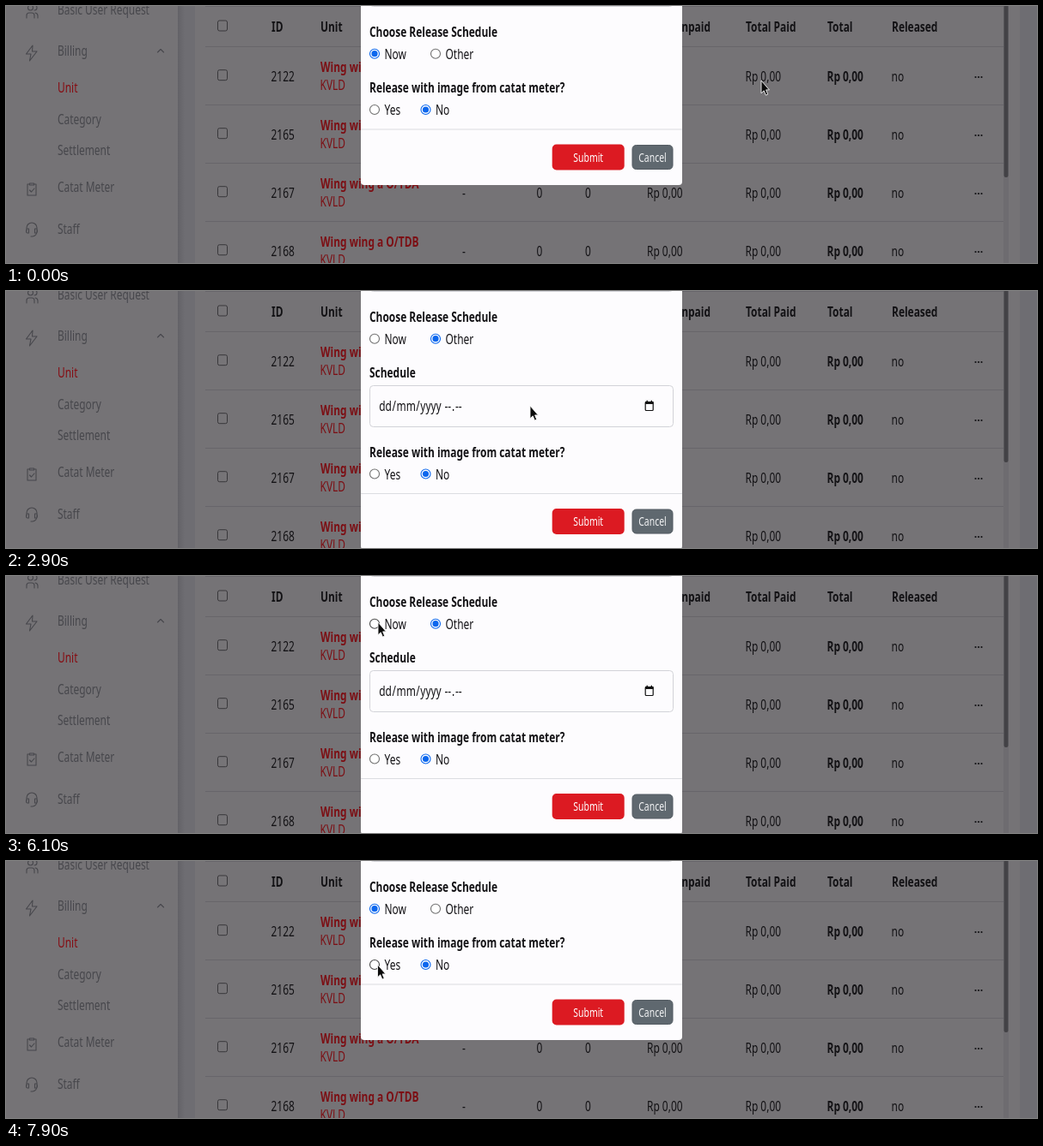
These frames come from a looping animation (1200 px wide and 300 px high, 8 s). An HTML page:

```html
<!DOCTYPE html>
<html lang="en">
<head>
<meta charset="utf-8">
<title>Release schedule</title>
<style>
  html, body { margin: 0; width: 100%; height: 100%; overflow: hidden; background: #757376; }
  svg { display: block; width: 100vw; height: 100vh; cursor: default; }
  text { font-family: "Noto Sans", "Open Sans", sans-serif; font-size: 16px; white-space: pre; }
  .b { font-weight: 600; }
</style>
</head>
<body>
<svg id="stage" viewBox="0 0 1200 300" preserveAspectRatio="none"></svg>
<script>
const NS = "http://www.w3.org/2000/svg";
const stage = document.getElementById("stage");

function add(parent, tag, attrs = {}) {
  const el = document.createElementNS(NS, tag);
  for (const k in attrs) el.setAttribute(k, attrs[k]);
  parent.appendChild(el);
  return el;
}

// Use the installed condensed face; if there is none, narrow the regular one.
function pickFace() {
  const probe = add(stage, "text");
  probe.textContent = "Basic User Request";
  const wanted = 107;
  let best = null;
  for (const stretch of ["normal", "condensed", "extra-condensed"]) {
    probe.style.fontStretch = stretch;
    const ratio = wanted / probe.getComputedTextLength();
    if (!best || Math.abs(ratio - 1) < Math.abs(best.ratio - 1)) best = { stretch, ratio };
  }
  probe.remove();
  stage.style.fontStretch = best.stretch;
  return Math.abs(best.ratio - 1) < 0.04 ? 1 : best.ratio;
}
const narrow = pickFace();

function label(parent, str, x, y, fill, opts = {}) {
  const el = add(parent, "text", {
    transform: `translate(${x} ${y}) scale(${narrow} 1)`,
    fill,
    "text-anchor": opts.anchor || "start"
  });
  if (opts.bold) el.setAttribute("class", "b");
  if (opts.size) el.style.fontSize = opts.size + "px";
  el.textContent = str;
  return el;
}
const box = (parent, x, y, width, height, fill, more) =>
  add(parent, "rect", { x, y, width, height, fill, ...more });
const stroke = (parent, d, color, width = 1.1) =>
  add(parent, "path", {
    d, fill: "none", stroke: color, "stroke-width": width,
    "stroke-linecap": "round", "stroke-linejoin": "round"
  });
const group = (parent) => add(parent, "g");

const PAPER = "#757376", INK = "#131215", MUTED = "#47474c", RED = "#7c0f14", LINE = "#67656a";

function drawPage() {
  const g = group(stage);
  const fade = add(add(g, "defs"), "linearGradient", { id: "edge" });
  add(fade, "stop", { offset: 0, "stop-color": "#636267" });
  add(fade, "stop", { offset: 1, "stop-color": "#6e6d72" });
  box(g, 0, 0, 1200, 300, "#6e6d72");
  box(g, 200, 0, 8, 300, "url(#edge)");
}

function drawSidebar() {
  const g = group(stage);
  box(g, 0, 0, 200, 300, PAPER);
  const items = [
    ["Basic User Request", 9.5], ["Billing", 58], ["Unit", 101], ["Category", 137.5],
    ["Settlement", 174], ["Catat Meter", 217], ["Staff", 266]
  ];
  for (const [name, y] of items) label(g, name, 60, y, name === "Unit" ? "#860d13" : MUTED);
  stroke(g, "M176.5 54L180 50.5L183.5 54", MUTED);
  // users
  stroke(g, "M24 14V11Q24 8 27 8H30Q33 8 33 11V14M34 8Q37 8.5 37 11.5V14M31.5 2A3 3 0 1 1 25.5 2A3 3 0 1 1 31.5 2M33 -1A3 3 0 0 1 33 5", MUTED);
  // bolt
  stroke(g, "M31 46L23.5 56H29L27.5 64L36 53H30.5Z", MUTED);
  // clipboard
  stroke(g, "M27 208H25V221H35V208H33M27.5 207H32.5V209H27.5ZM27.5 215L29.5 217L33 213", MUTED);
  // headset
  stroke(g, "M24 262V259A6 6 0 0 1 36 259V263Q36 268 31 269M24 260H26.5V265H25Q23.5 265 23.5 262.5ZM36 260H33.5V265H35Q36.5 265 36.5 262.5ZM29 269H31", MUTED);
}

function drawTable() {
  const g = group(stage);
  box(g, 220, 0, 960, 300, PAPER);
  for (const y of [0, 47, 115, 183, 251]) box(g, 232, y, 930, 1, LINE);
  box(g, 1161, 0, 6, 300, "#6e6c70");
  box(g, 1161.5, -6, 5, 206, "#434246", { rx: 2.5 });

  const heads = [["ID", 309], ["Unit", 366], ["Total Paid", 861], ["Total", 956], ["Released", 1031]];
  for (const [name, x] of heads) label(g, name, x, 30, INK, { bold: true });
  label(g, "Unpaid", 820, 30, INK, { bold: true, anchor: "end" });

  const check = (y) => box(g, 246.5, y - 6, 11, 12, "#767477", { rx: 2, stroke: "#38373a" });
  check(23);

  [[2122, "X"], [2165, "X"], [2167, "A"], [2168, "B"]].forEach(([id, suffix], i) => {
    const y = 88 + i * 68;
    check(y - 7.3);
    label(g, id, 308.5, y, INK);
    label(g, "Wing wing a O/TD" + suffix, 366, y - 11, RED, { bold: true });
    label(g, "KVLD", 365.5, y + 10, RED);
    label(g, "-", 531, y, INK);
    label(g, "0", 617.5, y, INK);
    label(g, "0", 674, y, INK);
    label(g, "Rp 0,00", 746, y, INK);
    label(g, "Rp 0,00", 860.5, y, INK);
    label(g, "Rp 0,00", 955.5, y, INK, { bold: true });
    label(g, "no", 1030.5, y, INK);
    for (const x of [1128.5, 1132, 1135.5]) add(g, "circle", { cx: x, cy: y - 5, r: 1.1, fill: INK });
  });
}

function radio(parent, name, x, y) {
  const ring = add(parent, "circle", { cx: x, cy: y, r: 5.5, fill: "#fff", "stroke-width": 1.1 });
  const dot = add(parent, "circle", { cx: x, cy: y, r: 3.6 });
  label(parent, name, x + 11.5, y + 6, INK);
  return (on, hover) => {
    const blue = hover ? "#0a4fb8" : "#0b67ee";
    ring.setAttribute("stroke", on ? blue : hover ? "#4a4a4a" : "#707070");
    dot.setAttribute("fill", on ? blue : "none");
  };
}

function drawDialog() {
  const g = group(stage);
  const panel = box(g, 413, -20, 374, 229, "#fdfcfe", { rx: 4 });
  box(g, 423.5, -40, 353, 40.5, "none", { rx: 4, stroke: "#d2d3d8" });
  label(g, "Choose Release Schedule", 423, 36, INK, { bold: true });
  const now = radio(g, "Now", 429, 55.7);
  const other = radio(g, "Other", 500, 55.7);

  const field = group(g);
  label(field, "Schedule", 423, 101, INK, { bold: true });
  const frame = box(field, 423.5, 110.5, 353, 48, "#fdfcfe", { rx: 4 });
  const mark = box(field, 434, 124.5, 15.5, 20, "#a6cbf7");
  const parts = [["dd", 434.2], ["/", 449.5], ["mm", 454.5], ["/", 477.3], ["yyyy", 482.3], ["--", 510.5], [".", 519], ["--", 523]];
  for (const [s, x] of parts) label(field, s, x, 140, INK);
  // calendar
  box(field, 744.2, 129.5, 9, 10, "none", { stroke: "#111", "stroke-width": 1.2, rx: 1 });
  box(field, 744, 129, 9.5, 3, "#111");
  box(field, 745.5, 127.7, 1.4, 2, "#111");
  box(field, 750.6, 127.7, 1.4, 2, "#111");

  const lower = group(g);
  label(lower, "Release with image from catat meter?", 423, 101, INK, { bold: true });
  const yes = radio(lower, "Yes", 429, 121);
  const no = radio(lower, "No", 488.5, 121);
  box(lower, 413, 143.5, 374, 1, "#dcdde1");
  box(lower, 635.7, 161.5, 84, 30, "#dc1a22", { rx: 5 });
  label(lower, "Submit", 677.7, 181.7, "#fff", { size: 14, anchor: "middle" });
  box(lower, 729, 162.5, 47, 28, "#5f686f", { rx: 4.5, stroke: "#535b62" });
  label(lower, "Cancel", 752.5, 181.7, "#f2f3f4", { size: 14, anchor: "middle" });

  return ({ open, focus, hover }) => {
    const shift = open ? 92.5 : 0;
    panel.setAttribute("height", 229 + shift);
    lower.setAttribute("transform", `translate(0 ${shift})`);
    field.setAttribute("display", open ? "inline" : "none");
    frame.setAttribute("stroke", focus ? "#1a56c4" : "#d2d3d8");
    frame.setAttribute("stroke-width", focus ? 2 : 1);
    mark.setAttribute("display", focus ? "inline" : "none");
    now(!open, hover(429, 55.7));
    other(open, hover(500, 55.7));
    yes(false, hover(429, 121 + shift));
    no(true, hover(488.5, 121 + shift));
  };
}

drawPage();
drawSidebar();
drawTable();
const setDialog = drawDialog();
const pointer = add(stage, "path", {
  d: "M0 0V14.8L3.2 11.8L5.4 17.1L7.7 16.1L5.6 10.9H9.4Z",
  fill: "#0b0b0b", stroke: "#f4f4f4", "stroke-width": 0.9, "stroke-linejoin": "round"
});

// time, x, y of the pointer tip
const PATH = [
  [0, 879, 87], [200, 870, 87], [900, 545, 72], [1200, 516.5, 62.5], [1500, 501, 54],
  [1900, 501, 54], [2600, 606, 131], [2900, 610, 134], [3500, 604, 135],
  [4300, 456, 83], [4800, 433, 54], [6400, 433, 54], [7200, 435, 106],
  [7400, 432.5, 121], [8000, 432.5, 121]
];

function tipAt(t) {
  const i = PATH.findIndex((p, n) => n && t <= p[0]);
  const [t0, x0, y0] = PATH[i - 1], [t1, x1, y1] = PATH[i];
  const u = (t - t0) / (t1 - t0), e = u * u * (3 - 2 * u);
  return [x0 + (x1 - x0) * e, y0 + (y1 - y0) * e];
}

const LOOP = 8000, STEP = 100;

function draw(ms) {
  const t = Math.floor((ms % LOOP) / STEP) * STEP;
  const [x, y] = tipAt(t);
  pointer.setAttribute("transform", `translate(${x} ${y})`);
  setDialog({
    open: t >= 1700 && t < 6200,
    focus: t >= 3300 && t < 6100,
    hover: (cx, cy) => Math.hypot(x - cx, y - cy) < 6
  });
}

const start = performance.now();
function tick() {
  draw(performance.now() - start);
  requestAnimationFrame(tick);
}
tick();
</script>
</body>
</html>
```
